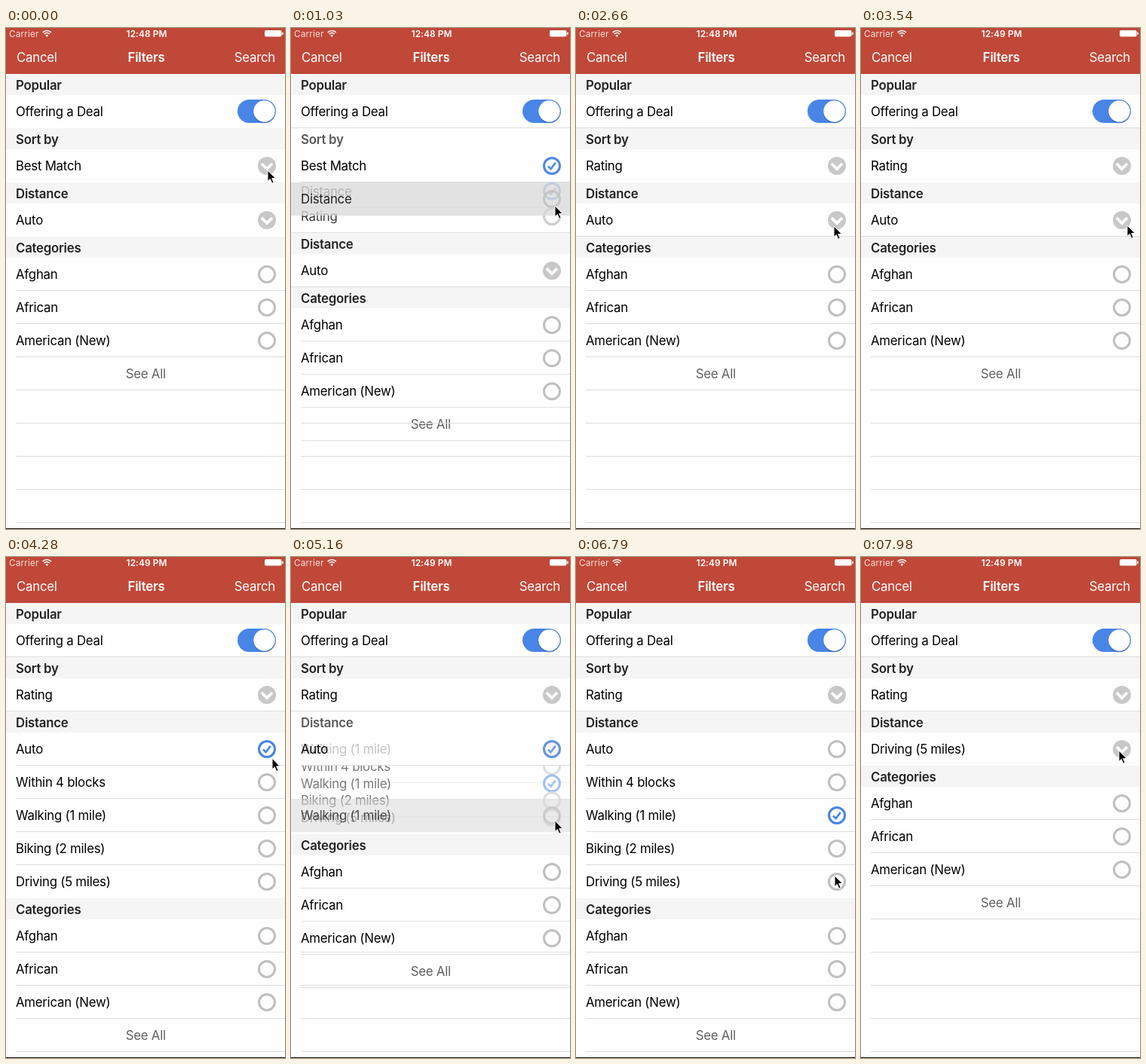
Write an HTML page that moves like this. It is 370 px wide and 665 px high and loops after 8 s.

```html
<!DOCTYPE html>
<html lang="en">
<head>
<meta charset="utf-8">
<title>Filters</title>
<style>
  html, body { margin: 0; width: 100%; height: 100%; overflow: hidden; background: #fefefe; }
  svg { display: block; width: 370px; height: 665px; }
  text { font: 400 16.8px Inter, "Liberation Sans", sans-serif; letter-spacing: -.23px; fill: #000; white-space: pre; }
  .head { font-weight: 600; fill: #222; }
  .nav { fill: #fff; }
  .title { font-weight: 600; fill: #fff; }
  .status { font-size: 11.8px; letter-spacing: .12px; fill: #fff; }
  .clock { font-weight: 600; }
  .more { fill: #606060; }
</style>
</head>
<body>
<svg id="stage" viewBox="0 0 370 665" xmlns="http://www.w3.org/2000/svg"></svg>
<script>
const LOOP = 8000, STEP = 147.7, LAG = 12, ROW = 44, EASE_MS = 300;
const GREY = '#bfbfbf', BLUE = '#4885e6', RED = '#c04838';

const lists = [
  { title: 'Sort by', rows: ['Best Match', 'Distance', 'Rating'] },
  { title: 'Distance', rows: ['Auto', 'Within 4 blocks', 'Walking (1 mile)', 'Biking (2 miles)', 'Driving (5 miles)'] }
];
const categories = ['Afghan', 'African', 'American (New)'];

// list, start in ms, picked row (none: the list opens)
const events = [
  [0, 50], [0, 939, 1], [0, 1659], [0, 2260, 2],
  [1, 3890], [1, 5023, 2], [1, 5650], [1, 6990, 4]
];

// step, x, y of the pointer tip
const pointer = [
  [0, 347, 189], [2, 347, 189], [5, 350, 236], [7, 350, 236], [8, 349, 215],
  [10, 345, 187], [12, 345, 187], [13, 340, 250], [14, 342, 262], [17, 342, 264],
  [19, 342, 262], [24, 353, 262], [27, 353, 262], [30, 353, 270], [34, 350, 350],
  [35, 350, 350], [36, 350, 330], [38, 352, 258], [39, 352, 258], [41, 357, 387],
  [46, 343, 423], [48, 343, 423], [50, 343, 400], [54, 342, 257]
];

const smooth = u => { u = Math.min(1, Math.max(0, u)); return u * u * (3 - 2 * u); };
const text = (x, y, s, cls = '', anchor = 'start') =>
  `<text x="${x}" y="${y}" class="${cls}" text-anchor="${anchor}">${s}</text>`;
const rect = (x, y, w, h, fill, more = '') =>
  `<rect x="${x}" y="${y}" width="${w}" height="${h}" fill="${fill}" ${more}/>`;
const line = (y, x = 13) => rect(x, y, 370 - x, 1, '#dddddf');
const fade = (a, s) => a >= 1 ? s : `<g opacity="${a.toFixed(3)}">${s}</g>`;
const stroke = (d, color, w) =>
  `<path d="${d}" fill="none" stroke="${color}" stroke-width="${w}"/>`;

const radio = (y, on) =>
  `<circle cx="346" cy="${y}" r="10.5" fill="none" stroke="${on ? BLUE : GREY}" stroke-width="3"/>` +
  (on ? stroke(`M341 ${y + .5}l3.6 3.6 6.2-8.2`, BLUE, 2.6) : '');
const chevron = y =>
  `<circle cx="346" cy="${y}" r="12" fill="#c8c8c8"/>` + stroke(`M339 ${y - 3}l7 7 7-7`, '#fff', 3.8);
const label = (y, s) => text(13, y + 28, s);
const option = (y, s, on) => label(y, s) + radio(y + 22, on);

function header(y, s, ruled, faded) {
  return (faded ? '' : rect(0, y, 370, 28, '#f5f5f5')) +
    (ruled ? line(y - 1, 0) : '') +
    fade(faded ? .75 : 1, text(13, y + 20.5, s, 'head'));
}

function listState(index, t) {
  const s = { k: 0, sel: 0, was: 0, pick: -1 };
  for (const [i, start, pick = -1] of events) {
    if (i !== index || start > t) continue;
    const u = smooth((t - start) / EASE_MS);
    s.k = pick < 0 ? u : 1 - u;
    s.was = s.sel;
    s.pick = pick;
    if (pick >= 0) s.sel = pick;
  }
  s.extra = s.k * ROW * (lists[index].rows.length - 1);
  s.moving = s.k > .1 && s.k < .9;
  return s;
}

function list(index, y, s, ruled) {
  const { title, rows } = lists[index], top = y + 28, { k, pick } = s;
  const closed = label(top, rows[s.sel]) + chevron(top + 22);
  let out = header(y, title, ruled, s.moving);
  if (!k) return out + closed;

  out += fade(k, rows.map((r, i) => {
    const ry = top + ROW * k * i;
    return i ? option(ry, r, i === s.sel) + (i < rows.length - 1 ? line(ry + 43) : '') : '';
  }).join(''));

  if (pick > 0) {
    const py = top + ROW * pick;
    out += fade(k, rect(0, py, 370, ROW, '#d9d9d9')) +
      fade(k ** .6, option(py, rows[pick], false));
  }
  return out + fade(Math.min(1, 2 * k),
    rect(0, top, 370, ROW, '#fefefe') + option(top, rows[0], s.was === 0) + line(top + 43)) +
    fade((1 - k) ** 2, closed);
}

function bar(n) {
  return rect(0, 0, 370, 61, RED) +
    fade(.82, text(4, 11.6, 'Carrier', 'status')) +
    text(186.5, 11.6, n < 22 ? '12:48 PM' : '12:49 PM', 'status clock', 'middle') +
    stroke('M48.6 5.9a8 8 0 0 1 11.2 0M50.6 8a5 5 0 0 1 7.2 0', '#fff', 1.5) +
    '<path d="M54.2 12l-2-2.2a3 3 0 0 1 4 0z" fill="#fff"/>' +
    rect(343, 3, 22.5, 8.6, '#fff', 'rx="1.8"') + rect(366.2, 5.6, 1.5, 3.6, '#fff', 'rx=".7"') +
    text(14, 45.3, 'Cancel', 'nav') +
    text(186, 45.3, 'Filters', 'title', 'middle') +
    text(357, 45.3, 'Search', 'nav', 'end');
}

const toggle = rect(307, 95, 51, 31, BLUE, 'rx="15.5"') +
  '<circle cx="342.5" cy="112.5" r="14.2" fill="#000" opacity=".15"/>' +
  '<circle cx="342.5" cy="110.5" r="14.2" fill="#fff"/>';

function cursor(n) {
  const i = Math.max(1, pointer.findIndex(p => p[0] >= n));
  const [a, ax, ay] = pointer[i - 1], [b, bx, by] = pointer[i];
  const u = (n - a) / (b - a);
  return `<path transform="translate(${ax + (bx - ax) * u} ${ay + (by - ay) * u})"
    d="M0 0V14.5L3.3 11.4 5.8 17.2 8.2 16.2 5.7 10.5H10.3Z" fill="#000" stroke="#fff" stroke-width="1"/>`;
}

function draw(n) {
  const t = n * STEP;
  const sort = listState(0, t), dist = listState(1, t);
  const distY = 205 + sort.extra, off = sort.extra + dist.extra, catY = 277 + off;

  // While a list opens, empty rows below already make room for it.
  const opening = [sort, dist].map((s, i) => s.k && s.pick < 0 ? ROW * (lists[i].rows.length - 1) : 0);
  const room = 480 + opening[0] + opening[1];
  let out = rect(0, 0, 370, 665, '#fefefe');

  out += header(61, 'Popular') + label(89, 'Offering a Deal') + toggle;
  out += list(0, 133, sort, n >= 1);
  out += list(1, distY, dist, n >= 27 || (sort.moving && sort.pick >= 0));
  out += header(catY, 'Categories', n >= 1 && n < 27);
  categories.forEach((c, i) => {
    const y = catY + 28 + ROW * i;
    out += rect(0, y, 370, ROW, '#fefefe') + option(y, c, false) + line(y + 43);
  });
  out += rect(0, 437 + off, 370, ROW, '#fefefe') +
    text(185.3, 465 + off, 'See All', 'more', 'middle') + line(480 + off);
  for (let y = 524; y < 665; y += ROW) if (y > room) out += line(y);

  out += rect(0, 664, 370, 1, '#111') + bar(n) + cursor(n);
  stage.innerHTML = out;
}

const stage = document.getElementById('stage');
const t0 = performance.now();
let shown = -1;
function tick() {
  const t = (performance.now() - t0) % LOOP;
  const n = Math.min(54, Math.floor((t + LAG) / STEP));
  if (n !== shown) draw(shown = n);
  requestAnimationFrame(tick);
}
tick();
</script>
</body>
</html>
```
